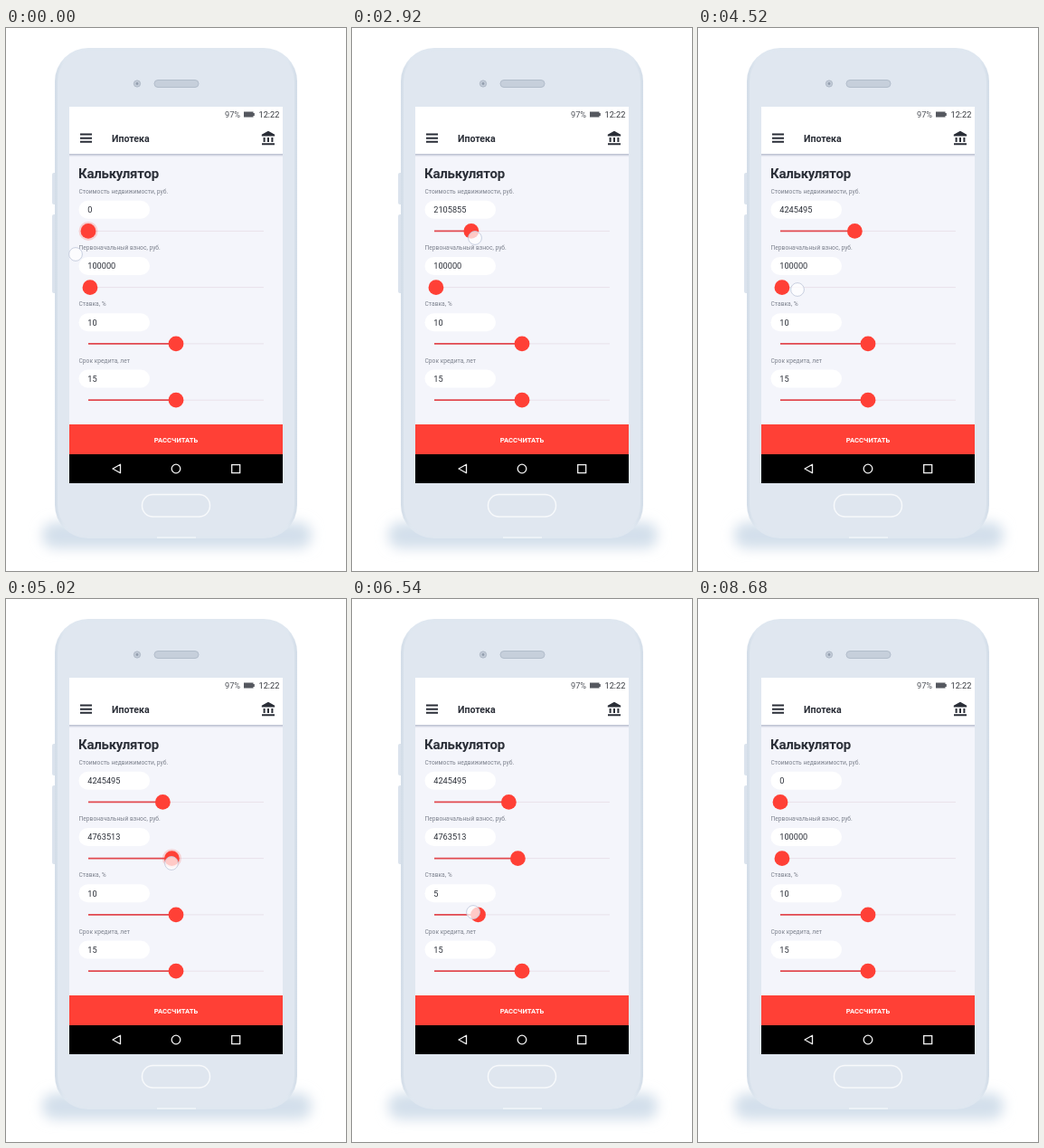
These frames come from a looping animation (376 by 600 pixels, 8.74 s). An HTML page:

```html
<!DOCTYPE html>
<html lang="ru">
<head>
<meta charset="utf-8">
<title>Ипотека</title>
<style>
html, body { margin: 0; width: 100%; height: 100%; overflow: hidden; background: #fff; }
svg { display: block; width: 376px; height: 600px; }
text { font-family: Roboto, "Noto Sans", sans-serif; fill: #2b2f38; }
.bold { font-weight: 700; }
.label { font-size: 6.7px; fill: #7d828e; }
.value { font-size: 9.2px; }
.status { font-size: 9.2px; fill: #50535a; }
.rail { stroke: #e9e1ea; stroke-width: 1; }
.fill { stroke: #e24a50; stroke-width: 1.7; }
.knob { fill: #ff4036; }
.halo { fill: #ff4036; fill-opacity: .2; opacity: 0; }
.nav { fill: none; stroke: #f2f2f2; stroke-width: 1.3; }
</style>
</head>
<body>
<svg viewBox="0 0 376 600">
  <defs>
    <filter id="blur" x="-20%" y="-80%" width="140%" height="260%"><feGaussianBlur stdDeviation="7"/></filter>
    <filter id="soft" x="-5%" y="-200%" width="110%" height="500%"><feGaussianBlur stdDeviation="1"/></filter>
    <linearGradient id="body" x2="1" y2="0">
      <stop offset="0" stop-color="#d3dde8"/>
      <stop offset=".04" stop-color="#dfe7f0"/>
      <stop offset=".96" stop-color="#dfe7f0"/>
      <stop offset="1" stop-color="#d3dde8"/>
    </linearGradient>
    <clipPath id="screen"><rect x="70" y="87" width="236" height="416"/></clipPath>
  </defs>

  <!-- phone -->
  <rect x="40" y="546" width="298" height="29" rx="14" fill="#d3dfeb" filter="url(#blur)"/>
  <rect x="51" y="160" width="6" height="35" rx="2" fill="#dbe3ed"/>
  <rect x="51" y="206" width="6" height="87" rx="2" fill="#dbe3ed"/>
  <rect x="54" y="22" width="268" height="542" rx="37" fill="url(#body)"/>
  <rect x="57" y="25" width="262" height="536" rx="34" fill="#e0e7f0"/>
  <rect x="167" y="562" width="43" height="2" fill="#edf2f7"/>
  <circle cx="145" cy="61.5" r="3.6" fill="#c3ccd8" stroke="#aeb8c6"/>
  <circle cx="145" cy="61.5" r="1.4" fill="#929dad"/>
  <rect x="164" y="57.5" width="49" height="8" rx="4" fill="#c6cfdb" stroke="#b2bdcb"/>
  <rect x="150.5" y="515.5" width="75" height="24.5" rx="12" fill="#dfe6ef" stroke="#f8fafc" stroke-width="1.4"/>

  <g clip-path="url(#screen)">
    <rect x="70" y="87" width="236" height="416" fill="#f4f5fb"/>
    <rect x="66" y="138.3" width="244" height="2" fill="#9ba2b8" filter="url(#soft)"/>
    <rect x="70" y="87" width="236" height="52" fill="#fff"/>

    <text class="status" x="242" y="98.7">97%</text>
    <path d="M263 92.6h10.5v1.4h1.3v3h-1.3v1.4h-10.5z" fill="#55585f"/>
    <text class="status" x="279.5" y="98.7" style="fill:#33363c">12:22</text>

    <path d="M82 117.6h13M82 121.7h13M82 125.8h13" stroke="#2b2f38" stroke-width="2"/>
    <text class="bold" x="117" y="125.6" font-size="10.6">Ипотека</text>
    <g fill="#2b2f38">
      <path d="M290 113.8l7.2 4v1.6h-14.4v-1.6z"/>
      <path d="M284.6 121h2v5h-2zM289 121h2v5h-2zM293.4 121h2v5h-2zM283 127.2h14v2h-14z"/>
    </g>

    <text class="bold" x="80" y="166" font-size="15" letter-spacing="-.25">Калькулятор</text>
    <g id="rows"></g>

    <rect x="70" y="438" width="236" height="33" fill="#ff4036"/>
    <text class="bold" x="188" y="458" font-size="7.7" text-anchor="middle" style="fill:#fff">РАССЧИТАТЬ</text>
    <rect x="70" y="471" width="236" height="32" fill="#000"/>
    <path class="nav" d="M126.5 482.3v9.4l-8.5-4.7z" stroke-linejoin="round"/>
    <circle class="nav" cx="188" cy="487" r="4.8"/>
    <rect class="nav" x="249.7" y="482.6" width="9" height="9"/>
  </g>
  <circle id="touch" r="7.4" fill="#fff" fill-opacity=".72" stroke="#c3cbdd" stroke-width=".9"/>
</svg>

<script>
const LOOP = 8740, STEP = 20;
const RAIL = 91, RAIL_W = 194;

const EASE = {
  both: p => p * p * (3 - 2 * p),
  in: p => p * p,
  out: p => p * (2 - p),
  line: p => p
};

// Keys: [time, easing into the key, ...values]
const sliders = [
  { name: "Стоимость недвижимости, руб.", max: 1e7,
    keys: [[2500, "line", 0], [2920, "in", 2105855], [3344, "out", 4245495],
           [7270, "line", 4245495], [7500, "both", 0]],
    halo: [[0, "line", 1], [1020, "line", 1], [1240, "line", 0],
           [7480, "line", 0], [7520, "line", 1], [7660, "line", 1], [7880, "line", 0]] },
  { name: "Первоначальный взнос, руб.", max: 1e7,
    keys: [[4530, "line", 100000], [4980, "both", 4763513],
           [6970, "line", 4763513], [7170, "both", 100000]],
    halo: [[4960, "line", 0], [5000, "line", 1], [5080, "line", 1], [5260, "line", 0]] },
  { name: "Ставка, %", max: 20,
    keys: [[6180, "line", 10], [6540, "both", 5], [6660, "line", 5], [6860, "both", 10]] },
  { name: "Срок кредита, лет", max: 30, keys: [[0, "line", 15]] }
];

const touchPath = [
  [0, "line", 77, 250], [1300, "line", 77, 250],
  [1400, "line", 95, 234], [2480, "line", 95, 234],
  [2920, "in", 136, 232], [3340, "out", 177, 236], [3800, "line", 177, 236],
  [4400, "both", 95, 289], [4520, "in", 110, 289], [4960, "out", 183, 292],
  [5500, "line", 183, 292], [5940, "both", 190, 351], [6140, "line", 190, 350],
  [6540, "both", 134, 346], [6660, "line", 134, 346], [6860, "both", 184, 347],
  [6960, "both", 183, 290], [7160, "both", 88, 290],
  [7270, "both", 171, 232], [7500, "both", 77, 250]
];

const touchAlpha = [
  [0, "line", 1], [1020, "line", 1], [1240, "line", 0], [2400, "line", 0],
  [2480, "line", 1], [7660, "line", 1], [7880, "line", 0]
];

function sample(keys, t, i = 0) {
  const n = keys.findIndex(k => k[0] > t);
  if (n === 0) return keys[0][2 + i];
  if (n < 0) return keys[keys.length - 1][2 + i];
  const a = keys[n - 1], b = keys[n];
  const p = EASE[b[1]]((t - a[0]) / (b[0] - a[0]));
  return a[2 + i] + (b[2 + i] - a[2 + i]) * p;
}

function add(parent, tag, attrs) {
  const el = document.createElementNS("http://www.w3.org/2000/svg", tag);
  for (const k in attrs) el.setAttribute(k, attrs[k]);
  return parent.appendChild(el);
}

const rows = document.getElementById("rows");
const touch = document.getElementById("touch");

sliders.forEach((s, i) => {
  const g = add(rows, "g", { transform: `translate(0 ${i * 62.25})` });
  const y = 224.4;
  add(g, "text", { class: "label", x: 80.5, y: 182.8 }).textContent = s.name;
  add(g, "rect", { x: 80.5, y: 190.7, width: 78.5, height: 20, rx: 10, fill: "#fff" });
  s.text = add(g, "text", { class: "value", x: 90.3, y: 204.2 });
  add(g, "line", { class: "rail", x1: RAIL, x2: RAIL + RAIL_W, y1: y, y2: y });
  s.fill = add(g, "line", { class: "fill", x1: RAIL, y1: y, y2: y });
  s.ring = add(g, "circle", { class: "halo", cy: y, r: 10.5 });
  s.knob = add(g, "circle", { class: "knob", cy: y, r: 8.4 });
});

function draw(t) {
  for (const s of sliders) {
    const v = sample(s.keys, t);
    const x = RAIL + RAIL_W * v / s.max;
    s.text.textContent = Math.round(v);
    s.fill.setAttribute("x2", x);
    s.knob.setAttribute("cx", x);
    s.ring.setAttribute("cx", x);
    s.ring.style.opacity = s.halo ? sample(s.halo, t) : 0;
  }
  touch.setAttribute("cx", sample(touchPath, t));
  touch.setAttribute("cy", sample(touchPath, t, 1));
  touch.style.opacity = sample(touchAlpha, t);
}

const start = performance.now();
function tick() {
  const t = Math.max(0, performance.now() - start) % LOOP;
  draw(Math.floor(t / STEP) * STEP);
  requestAnimationFrame(tick);
}
tick();
</script>
</body>
</html>
```
